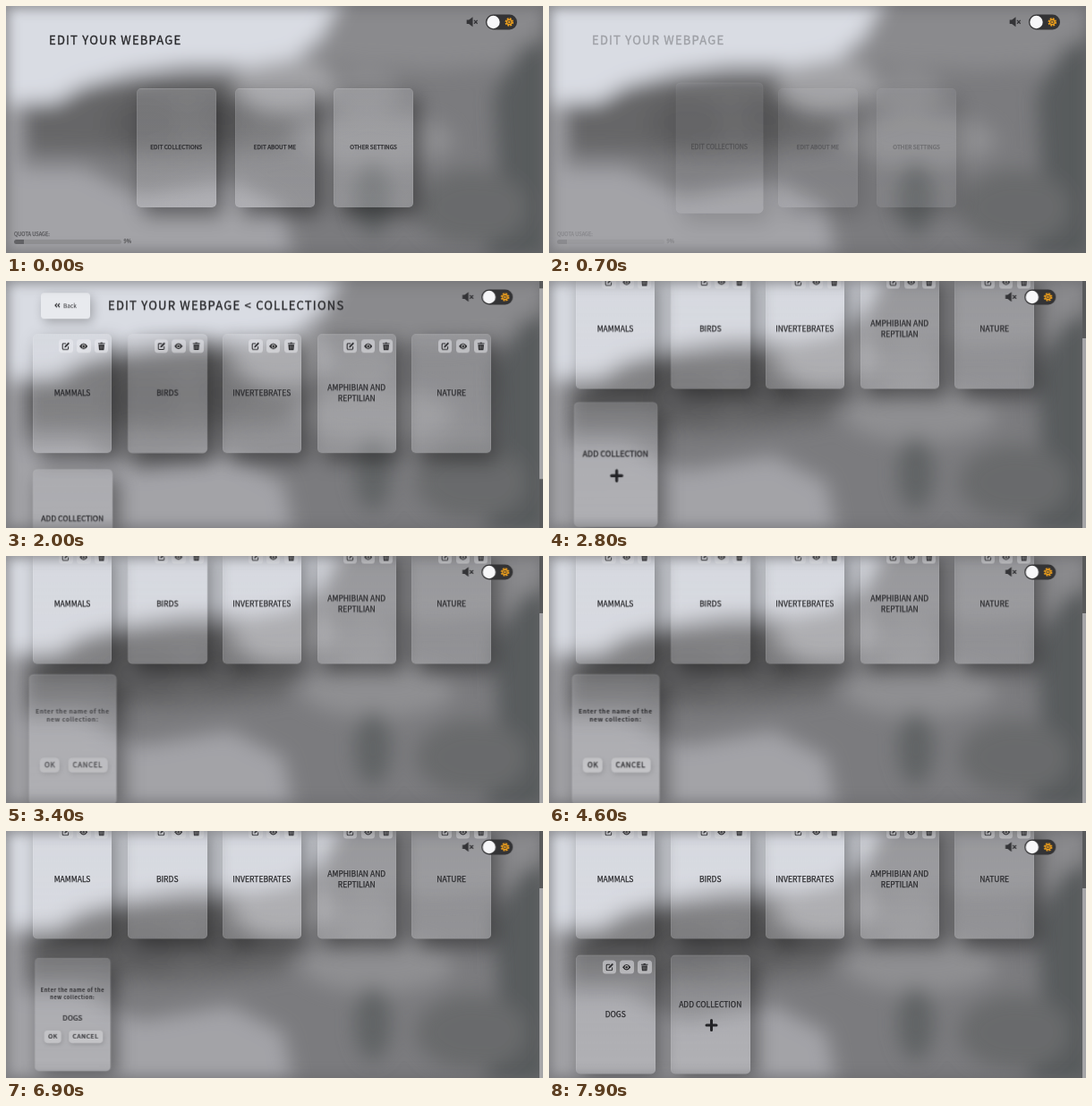
An HTML page for the animation above (8 s loop, 600 by 276 pixels).

```html
<!DOCTYPE html>
<html lang="en">
<head>
<meta charset="utf-8">
<title>Edit your webpage</title>
<style>
* { box-sizing: border-box; animation-duration: 8s; animation-iteration-count: infinite; animation-timing-function: linear; }
html, body { margin: 0; width: 100%; height: 100%; overflow: hidden; background: #77787a; }
body { font: 400 8.55px/12px "Noto Sans CJK JP", "Noto Sans CJK SC", "Noto Sans CJK", "Noto Sans", sans-serif; color: #29292c; -webkit-text-stroke: .25px; }
#stage { position: relative; width: 600px; height: 276px; overflow: hidden; }
.fill, .card, .at { position: absolute; }
.fill { inset: 0; }
.at { white-space: nowrap; }
.mid { left: 0; width: 100%; text-align: center; }
.edge { box-shadow: inset 0 0 13px 3px rgba(104, 104, 107, .68); }

h1 { margin: 0; top: 28px; font: inherit; font-size: 13px; line-height: 20px; letter-spacing: 1.23px; -webkit-text-stroke: .35px; }
.card {
  width: 88.5px; height: 133px; border-radius: 5px;
  background: linear-gradient(rgba(208, 209, 214, .2), rgba(212, 212, 216, .27));
  border: .6px solid rgba(255, 255, 255, .07);
  box-shadow: 7px 9px 22px rgba(0, 0, 0, .42);
}
.label { position: absolute; inset: 0 0 2.4px; display: flex; align-items: center; justify-content: center; text-align: center; white-space: pre; }
#main .label { font-size: 6.45px; bottom: .4px; }
.tools { position: absolute; left: 28.6px; top: 4.6px; display: flex; gap: 4.4px; }
.tools i { width: 15.4px; height: 15.4px; padding: 3px; border-radius: 3.5px; background: rgba(240, 240, 244, .48); }
.tools svg { display: block; width: 9.4px; height: 9.4px; }

.back {
  left: 38.5px; top: 23.5px; width: 55.5px; height: 29px; padding-left: 25.5px; border-radius: 4px;
  font-size: 6.5px; line-height: 28.5px; -webkit-text-stroke: 0;
  background: rgba(255, 255, 255, .4); box-shadow: 3px 4px 12px rgba(0, 0, 0, .25);
}
.quota { color: #59595c; font-size: 5.7px; }
.bar { left: 9px; top: 261px; width: 120px; height: 4.6px; border-radius: 3px; background: linear-gradient(90deg, #626265 11px, rgba(140, 140, 143, .8) 0); }

.ask { top: 32.5px; font-size: 6.1px; font-weight: 700; line-height: 8.6px; letter-spacing: .49px; white-space: pre; -webkit-text-stroke: 0; }
.btn { top: 83.7px; height: 15.5px; border-radius: 4px; text-align: center; font-size: 7.2px; line-height: 14.6px; letter-spacing: .6px; background: rgba(255, 255, 255, .26); box-shadow: 1px 2px 6px rgba(0, 0, 0, .15); }
.entry { top: 61.5px; height: 12.7px; line-height: 12.7px; }
.entry span { font-size: 0; animation-name: type; animation-timing-function: step-end; animation-fill-mode: backwards; }
.caret { display: inline-block; width: .9px; height: 12.7px; margin-right: -.9px; vertical-align: middle; background: #333; animation-name: caret; animation-timing-function: step-end; }
.focus { left: 15.6px; top: 61.5px; width: 57.3px; height: 12.7px; background: rgba(255, 255, 255, .12); animation-name: focus; }

#main { animation-name: leave; }
#coll { animation-name: enter; }
#scroll { animation-name: scroll; }
.bars { left: 596px; top: 0; width: 4px; height: 276px; background: #58595a; animation-name: appear; }
.thumb { width: 4px; height: 212.5px; background: #a6a6a8; animation-name: thumb; }
.controls { left: 514px; top: 8.5px; animation-name: shift; }
.pick { animation-name: pick; }
.peek { animation-name: peek; }
.adder { animation-name: adder; }
.prompt { animation-name: prompt; }
.form { animation-name: form; }
.fresh { animation-name: fresh; }

@keyframes pick { 0%, 1.25% { transform: none; animation-timing-function: ease-out } 3.75%, 100% { transform: scale(1.1) } }
@keyframes leave { 0%, 6.25% { opacity: 1 } 10%, 100% { opacity: 0 } }
@keyframes enter { 0%, 10% { opacity: 0 } 15.5%, 100% { opacity: 1 } }
@keyframes appear { 0%, 9.99% { opacity: 0 } 10%, 100% { opacity: 1 } }
@keyframes shift { 0%, 9.99% { transform: none } 10%, 100% { transform: translateX(-4.7px) } }
@keyframes peek { 0%, 13% { transform: none } 15.5%, 16.5% { transform: scale(1.055); animation-timing-function: ease } 20%, 100% { transform: none } }
@keyframes scroll { 0%, 22.75% { transform: none; animation-timing-function: ease-in-out } 31.75%, 100% { transform: translateY(-82.5px) } }
@keyframes thumb { 0%, 22.75% { transform: none; animation-timing-function: ease-in-out } 31.75%, 100% { transform: translateY(63.5px) } }
@keyframes adder {
  0%, 32.5% { transform: none; opacity: 1 }
  35%, 36.25% { transform: scale(1.05); animation-timing-function: ease }
  43.75%, 77% { transform: scale(1.1); animation-timing-function: ease-in-out }
  86% { transform: scale(.95) }
  87.5% { transform: scale(.95); opacity: 1 }
  88.75%, 100% { transform: scale(.95); opacity: 0 }
}
@keyframes prompt { 0%, 36.25% { opacity: 1 } 40%, 100% { opacity: 0 } }
@keyframes form { 0%, 39% { opacity: 0 } 43.75%, 100% { opacity: 1 } }
@keyframes focus { 0%, 49.5% { opacity: 0; transform: none } 51.25%, 53% { opacity: 1; transform: none } 55%, 100% { opacity: 0; transform: scaleX(.6) } }
@keyframes type { 0% { font-size: 0 } 60%, 100% { font-size: 8.55px } }
@keyframes caret { 0% { opacity: 0 } 50% { opacity: 1 } 57.45% { opacity: 0 } 60% { opacity: 1 } 71.25%, 100% { opacity: 0 } }
@keyframes fresh { 0%, 87.5% { opacity: 0; transform: scale(.95) } 91.25%, 100% { opacity: 1; transform: none } }
</style>
</head>
<body>
<div id="stage">
  <svg class="fill" width="600" height="276">
    <defs>
      <filter id="soft" x="-20%" y="-20%" width="140%" height="140%"><feGaussianBlur stdDeviation="11"/></filter>
      <symbol id="edit" viewBox="0 0 16 16">
        <path d="M8 3H3.5Q2 3 2 4.500V12.500Q2 14 3.500 14H11.500Q13 14 13 12.500V9" fill="none" stroke="#29292c" stroke-width="1.8" stroke-linecap="round"/>
        <path d="M5.500 10.500L6.200 7.500L12.500 1.200Q13.300.6 14 1.300L14.700 2Q15.400 2.800 14.700 3.500L8.500 9.800z" fill="#29292c"/>
      </symbol>
      <symbol id="eye" viewBox="0 0 16 16">
        <path d="M0 8Q8-3 16 8Q8 19 0 8z" fill="#29292c"/>
        <circle cx="8" cy="8" r="3.600" fill="#ccc"/><circle cx="8" cy="8" r="2.200" fill="#29292c"/>
      </symbol>
      <symbol id="trash" viewBox="0 0 16 16">
        <path d="M1.500 2H5.500L6.500.7H9.500L10.500 2H14.500V4H1.500zM2.500 5H13.500L12.800 14Q12.700 15.500 11.300 15.500H4.700Q3.300 15.500 3.200 14z" fill="#29292c"/>
        <path d="M5.600 7V13.300M8 7V13.300M10.400 7V13.300" stroke="#aaa" stroke-width=".8"/>
      </symbol>
    </defs>
    <rect width="600" height="276" fill="#7b7b7e"/>
    <g filter="url(#soft)">
      <path d="M365-50H660V55L480 72L345 62z" fill="#8a8a8d"/>
      <path d="M-50 100L120 82L250 80L330 110L310 160L170 170L100 162L-50 160z" fill="#666668"/>
      <ellipse cx="155" cy="130" rx="45" ry="28" fill="#5d5d5f"/>
      <path d="M-50 180H85L150 212L250 195L310 225L330 330H-50z" fill="#a3a3a7"/>
      <path d="M-50 95H18V330H-50z" fill="#a3a3a7"/>
      <path d="M575 45L545 100L550 180L530 330H660V20z" fill="#595c5d"/>
      <ellipse cx="415" cy="150" rx="85" ry="30" fill="#8f8f92"/>
      <ellipse cx="400" cy="95" rx="40" ry="25" fill="#8b8b8e"/>
      <ellipse cx="245" cy="125" rx="35" ry="24" fill="#5d5d5f"/>
      <ellipse cx="310" cy="85" rx="55" ry="32" fill="#a2a2a5"/>
      <ellipse cx="410" cy="215" rx="20" ry="42" fill="#616465"/>
      <ellipse cx="520" cy="225" rx="62" ry="42" fill="#696b6c"/>
      <path d="M-50-50H395L350 38L325 58L270 68L200 68L140 76L85 90L55 108L-50 110z" fill="#d9dce3"/>
    </g>
  </svg>

  <div id="main" class="fill">
    <h1 class="at" style="left:48px">EDIT YOUR WEBPAGE</h1>
    <div class="at quota" style="left:9px;top:248.700px">QUOTA USAGE:</div>
    <div class="at bar"></div>
    <div class="at quota" style="left:131.500px;top:257.200px">9%</div>
  </div>

  <div id="coll" class="fill">
    <div id="scroll" class="fill">
      <div class="at back">
        <svg class="at" style="left:15px;top:11.500px" width="7" height="6" viewBox="0 0 8 7" fill="none" stroke="#29292c" stroke-width="1.300"><path d="M3.500 1L1 3.500L3.500 6M7 1L4.500 3.500L7 6"/></svg>Back</div>
      <h1 class="at" style="left:114px">EDIT YOUR WEBPAGE &lt; COLLECTIONS</h1>
    </div>
  </div>

  <div class="fill edge"></div>
  <div class="at bars"><div class="thumb"></div></div>

  <svg class="at controls" width="60" height="18">
    <g transform="translate(.7 3.300)" fill="#343437">
      <path d="M0 3.300H2.500L6.800 0V11L2.500 7.700H0z"/>
      <path d="M8.300 3.600L12 7.400M12 3.600L8.300 7.400" stroke="#343437" stroke-width="1.300"/>
    </g>
    <rect x="22" y=".5" width="35" height="17" rx="8.500" fill="#333335"/>
    <circle cx="30.500" cy="9" r="7.200" fill="#f7f7f9"/>
    <g transform="translate(48.300 9)" fill="none" stroke="#f0a11c">
      <circle r="3.900" stroke-width="1.700" stroke-dasharray="1.900 1.163"/>
      <circle r="2.700" stroke-width="1.200"/><circle r="1.200" fill="#f0a11c" stroke="none"/>
    </g>
  </svg>
</div>

<script>
const tools = '<div class="tools">' +
  ['edit', 'eye', 'trash'].map(id => `<i><svg><use href="#${id}"/></svg></i>`).join('') + '</div>';
const label = text => `<div class="label">${text}</div>`;
const prompt = `<div class="fill prompt">
  <div class="at mid" style="top:46.800px">ADD COLLECTION</div>
  <svg class="at" style="left:36.700px;top:69.700px" width="15" height="15"><path d="M7.500 2V13M2 7.500H13" stroke="#232326" stroke-width="3" stroke-linecap="round"/></svg>
</div>`;
const letters = [...'DOGS'].map((c, i) =>
  `<span style="animation-delay:${i ? 0.1 + i * 0.1 : 0}s">${c}</span>`).join('');
const form = `<div class="fill form">
  <div class="at mid ask">Enter the name of the\nnew collection:</div>
  <div class="at focus"></div>
  <div class="at mid entry">${letters}<i class="caret"></i></div>
  <div class="at btn" style="left:10.300px;width:20px">OK</div>
  <div class="at btn" style="left:38.700px;width:40px">CANCEL</div>
</div>`;

function card(parent, x, y, html, cls = '') {
  document.getElementById(parent).insertAdjacentHTML('beforeend',
    `<div class="card ${cls}" style="left:${x}px;top:${y}px">${html}</div>`);
}
const slot = (n, html, cls) =>
  card('scroll', 29.8 + n % 5 * 105.9, 70 + Math.floor(n / 5) * 150.5, html, cls);

['EDIT COLLECTIONS', 'EDIT ABOUT ME', 'OTHER SETTINGS'].forEach((text, i) =>
  card('main', 146 + i * 110.2, 92, label(text), i ? '' : 'pick'));
['MAMMALS', 'BIRDS', 'INVERTEBRATES', 'AMPHIBIAN AND\nREPTILIAN', 'NATURE'].forEach((text, i) =>
  slot(i, label(text) + tools, i === 1 ? 'peek' : ''));
slot(5, prompt + form, 'adder');
slot(5, label('DOGS') + tools, 'fresh');
slot(6, prompt.replace(' prompt"', '"'), 'fresh');
</script>
</body>
</html>
```
